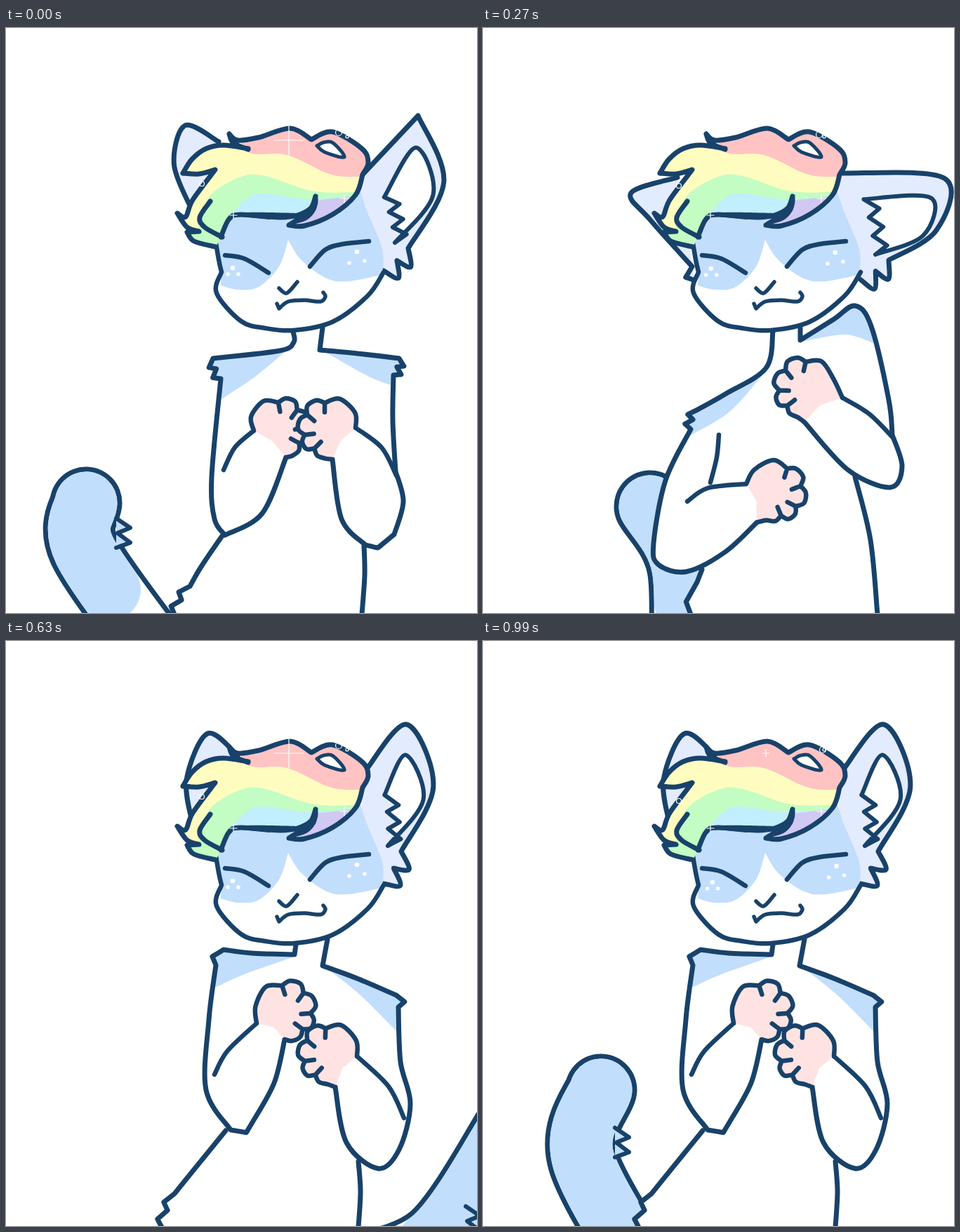
These frames come from a looping animation (671 by 834 pixels, 1080 ms). An HTML page:

```html
<!DOCTYPE html>
<html lang="en">
<head>
<meta charset="utf-8">
<title>Dancing cat</title>
<style>
html, body { margin: 0; width: 100%; height: 100%; overflow: hidden; background: #fff; }
svg { display: block; width: 100vw; height: 100vh; }
path { fill: none; stroke-linecap: round; stroke-linejoin: round; }
.frame {
  visibility: hidden;
  animation: show 1080ms step-end infinite;
  animation-delay: calc(var(--i) * 90ms - 1080ms);
}
@keyframes show {
  0% { visibility: visible; }
  8.33334%, 100% { visibility: hidden; }
}
</style>
</head>
<body>
<svg id="stage" viewBox="0 0 671 834" preserveAspectRatio="none"></svg>
<script>
const INK = '#18426a', BLUE = '#c2defd', EAR = '#e3ebff', PINK = '#ffe3e3';

const pt = (x, y, sharp = false) => ({ x, y, sharp });
const mix = (a, b, t) => pt(a.x + (b.x - a.x) * t, a.y + (b.y - a.y) * t);
const polar = (c, a, r, sharp) => pt(c.x + r * Math.cos(a), c.y + r * Math.sin(a), sharp);
const angle = (c, p) => Math.atan2(p.y - c.y, p.x - c.x);
const corner = p => ({ ...p, sharp: true });

// Point beside the line a-b: t along it, off to the side.
function beside(a, b, t, off) {
  const m = mix(a, b, t), len = Math.hypot(b.x - a.x, b.y - a.y);
  return pt(m.x + (b.y - a.y) / len * off, m.y - (b.x - a.x) / len * off);
}

// Teeth of fur between a and b, both ends excluded.
function fur(a, b, n, size, round = false) {
  const out = [];
  for (let k = 0; k < n; k++) {
    out.push({ ...beside(a, b, (k + .65) / n, size), sharp: !round });
    if (k < n - 1) out.push(corner(beside(a, b, (k + 1) / n, size * .1)));
  }
  return out;
}

// "x,y" points; "!" makes a corner, "~n" puts n teeth of fur before the next point.
function pts(s) {
  const out = [];
  let teeth = 0;
  for (const token of s.split(' ')) {
    const [xy, n] = token.split('~');
    const [x, y] = xy.split(',').map(parseFloat);
    const p = pt(x, y, token.endsWith('!') || !!n || !!teeth);
    if (teeth) out.push(...fur(out[out.length - 1], p, Math.abs(teeth), 10 * Math.sign(teeth)));
    out.push(p);
    teeth = +n || 0;
  }
  return out;
}
const rev = list => [...list].reverse();
const join = (...lists) => lists.flatMap(l => l.map((p, i) => i && i < l.length - 1 ? p : corner(p)));

function curve(list) {
  const p = typeof list === 'string' ? pts(list) : list;
  let d = `M${p[0].x} ${p[0].y}`;
  for (let i = 0; i < p.length - 1; i++) {
    const b = p[i], c = p[i + 1];
    const a = b.sharp || !i ? b : p[i - 1];
    const e = c.sharp || !p[i + 2] ? c : p[i + 2];
    const n = [b.x + (c.x - a.x) / 6, b.y + (c.y - a.y) / 6,
               c.x - (e.x - b.x) / 6, c.y - (e.y - b.y) / 6, c.x, c.y];
    d += 'C' + n.map(v => v.toFixed(1)).join(' ');
  }
  return d;
}
const fill = (s, color) => `<path d="${curve(s)}Z" style="fill:${color}"/>`;
const stroke = (d, w, color = INK, extra = '') =>
  `<path d="${d}" stroke="${color}" stroke-width="${w}" ${extra}/>`;
const line = (s, w = 7) => stroke((typeof s === 'string' ? s.split(';') : [s]).map(curve).join(''), w);

// left/right run neck, shoulder, elbow, wrist; paws are wrist and centre;
// ears are front base, tip, back base.
const poses = {
  A: {
    left: '409,433 410,448 390,460 295,471~-2 306,500 293,640 297,700 312,723! 365,692 399,612',
    right: '451,427 447,459! 500,464 560,471~2 552,495 551,560 555,632! 566,675 553,722~1 512,737 478,700 465,615',
    hipL: '308,724 278,768 262,796~-2 240,836', hipR: '510,738 511,780 507,836',
    folds: '310,630 326,598 353,574;498,570 535,598 556,638',
    paws: '353,574 389,570;498,570 460,570',
    blue: '397,462 355,497 307,529;455,462 515,496 551,510',
    ears: '303,162 255,139 264,258;507,210 587,125! 573,314'
  },
  B: {
    left: '411,433 412,448 370,469 303,500~-2 312,522 270,630 265,670 285,735 325,740 370,690 385,648',
    right: '453,425 452,453! 480,444 532,427~1 547,444 570,510 568,617! 566,675 540,712 500,670 467,592',
    hipL: '300,745 280,778 268,798~-2 258,836', hipR: '517,703 520,760 518,836',
    folds: '300,643 320,617 352,600;497,547 535,567 562,607',
    paws: '352,600 390,600;497,547 450,543',
    blue: '408,464 355,505 308,546;460,452 515,460 560,481',
    ears: '297,167 246,153 265,268;510,205 595,133 573,316'
  },
  C: {
    left: '415,433 405,472 360,500 318,518~-2 303,535 275,612 247,730 250,752~-2 290,767 345,733 388,697',
    right: '452,425 453,449! 500,420 540,403~1 548,418 572,480 582,580 589,655 578,671 540,663 490,612 462,576',
    hipL: '306,765 302,785~-3 288,836', hipR: '526,655 541,740 543,836',
    folds: '342,577 330,610 327,638;298,671 325,646 370,637;500,527 545,557 571,600',
    paws: '370,637 410,648;500,527 455,530',
    blue: '402,474 350,539 298,567;455,449 525,460 572,490',
    ears: '264,191 219,182 275,314;508,207 629,170 566,325'
  },
  D: {
    left: '413,433 403,485 345,522 304,545~-2 296,572 260,645 243,735 250,765 290,775 345,747 390,705',
    right: '452,428 452,445! 500,415 530,396 553,425 578,530 583,580! 597,625 580,655 520,630 458,562',
    hipL: '312,772 305,790~-1 296,836', hipR: '530,640 552,730 562,836',
    folds: '336,580 333,612 324,648;291,675 320,656 375,650;512,527 550,550 585,585',
    paws: '375,650 417,660;512,527 458,512',
    blue: '398,495 350,548 291,583;455,447 515,437 556,449',
    ears: '277,213 211,235 298,340;510,207 657,214 578,331'
  },
  F: {
    left: '413,433 411,447! 350,445 310,440~-1 299,462 289,540 285,640 320,697~-1 350,688 382,630 397,568',
    right: '458,425 451,463! 500,481 556,505~1 559,522 562,600 576,660 560,725 530,752 485,715 469,636',
    hipL: '313,698 265,757 240,788~-2 222,836', hipR: '502,742 505,785 502,836',
    folds: '297,618 315,585 357,545;500,592 545,635 567,680',
    paws: '357,545 398,527;500,592 460,588',
    blue: '408,451 340,475 300,493;455,465 505,505 556,556',
    ears: '330,163 287,132 266,262;512,185 571,119 563,300'
  },
  G: {
    left: '418,432 415,445! 365,433 314,424~-1 304,448 290,560 293,640 311,680! 370,640 411,550',
    right: '458,423 460,480 520,527 560,568~2 576,615 570,690 553,775 515,765 487,725 475,678',
    hipL: '313,682 275,738 235,783~-2 205,836', hipR: '502,762 499,800 490,836',
    folds: '309,610 330,563 379,506;501,630 530,672 552,726',
    paws: '379,506 420,505;501,630 460,620',
    blue: '400,447 340,465 299,496;475,494 515,560 565,604',
    ears: '332,156 300,130 270,258;508,195 564,117 555,298'
  }
};

// A fist: arc from wrist a round to wrist b, bulging between the knuckles.
function paw([a, c], b, dir) {
  const knots = [0, .36, .54, .71, .85, 1], turn = 2 * Math.PI;
  const from = angle(c, a), sweep = ((angle(c, b) - from) * dir + turn) % turn;
  const at = (t, r, sharp) => polar(c, from + dir * sweep * t, r, sharp);
  const edge = [corner(a)];
  let creases = '';
  for (let k = 1; k < knots.length; k++) {
    const t0 = knots[k - 1], dt = knots[k] - t0, last = k === knots.length - 1;
    edge.push(at(t0 + dt * .3, 43), at(t0 + dt * .7, 44));
    if (!last) {
      edge.push(at(knots[k], 36, true));
      creases += curve([at(knots[k], 36), at(knots[k] + .02, 23)]);
    }
  }
  edge.push(corner(b));
  const cuff = mix(mix(a, b, .5), c, .2);
  return fill([...edge, cuff], PINK) + stroke(curve(edge) + creases, 6.5);
}

function body(p, key) {
  const left = pts(p.left), right = pts(p.right), hipL = pts(p.hipL), hipR = pts(p.hipR);
  const shape = join(left, hipL, rev(hipR), rev(right));
  const patches = p.blue.split(';').map((s, i) => {
    const q = pts(s), side = i ? 640 : 220;
    return fill([...join(q), pt(side, q[2].y, true), pt(side, 380, true), pt(q[0].x, 380, true)], BLUE);
  });
  const paws = p.paws.split(';').map((s, i) => paw(pts(s), i ? right.at(-1) : left.at(-1), i ? -1 : 1));
  return fill(shape, '#fff') +
    `<clipPath id="clip${key}"><path d="${curve(shape)}Z"/></clipPath>` +
    `<g clip-path="url(#clip${key})">${patches.join('')}</g>` +
    [hipL, hipR, left, right].map(l => line(l)).join('') + line(p.folds, 6.5) + paws.join('');
}

function ears(p) {
  const [[lp, lt, lq], [rp, rt, rq]] = p.ears.split(';').map(pts);
  const size = Math.hypot(rt.x - rq.x, rt.y - rq.y);
  const cheek = pt(lq.x < 295 ? 300 : 302, lq.y + 20), jaw = pt(538, 346 + Math.max(0, rq.y - 315) * .8);
  const back = beside(rt, rq, .48, size * -.23);
  const left = [lp, lt, beside(lt, lq, .48, 20), corner(lq), ...fur(lq, cheek, 1, -12), cheek];
  const right = [rp, rt, beside(rt, rq, .48, -size * .23), corner(rq), ...fur(rq, jaw, 2, 22, true), jaw];
  // The outer edge bows away from the head on either side.
  left[2] = pt(Math.min(left[2].x, 2 * mix(lt, lq, .48).x - left[2].x), left[2].y);
  right[2] = pt(2 * mix(rt, rq, .48).x - back.x, 2 * mix(rt, rq, .48).y - back.y);
  const low = pt(rq.x - 19, rq.y - 8, true), m = mix(rp, rq, .3), front = pt(m.x + 12, m.y, true);
  const inner = [low, mix(right[2], low, .22), mix(rt, rq, .24), front, ...fur(front, low, 3, 19), low];
  return fill(left, EAR) + fill([...right, pt(500, 300, true)], EAR) + fill(inner, '#fff') +
    line(inner, 6) + line(left) + line(right);
}

// Spines, base to tip; the base lies below the stage.
const tails = [
  '225,905 112,745 114,677', '240,900 110,790 64,705', '175,930 138,770 137,688',
  '285,950 285,770 238,682', '560,930 560,800 545,735', '575,910 600,770 582,669',
  '470,890 600,800 668,690', '480,900 610,852 720,690', '470,900 570,800 615,735',
  '500,950 500,850 495,800', '250,950 238,735 285,665', '250,930 143,740 168,640'
];
function tail(spine) {
  const d = curve(spine), m = pts(spine)[1];
  const a = pt(m.x + 45, m.y - 46), b = pt(m.x + 45, m.y - 4);
  const tuft = [corner(a), ...fur(a, b, 2, 20), corner(b)];
  return stroke(d, 103) + stroke(d, 89, '#fff') +
    stroke(d, 89, BLUE, 'stroke-dasharray="999" stroke-dashoffset="-130"') +
    fill(tuft, BLUE) + line(tuft, 6);
}

function head() {
  const jaw = '298,300 303,330 307,348! 300,378 335,418 370,428 410,431 465,419 515,382 538,348';
  const mask = '298,300! 303,330 307,348! 306,367! 330,373 360,369 389,340 402,302! 423,333 470,361 536,352! 536,315 513,258 503,225! 320,255!';
  const crown = '318,151 330,160 360,156 405,143 435,159! 465,148 507,172 516,192 508,209';
  const rim = '508,209 498,238 465,266 425,282 403,281! 437,258 441,240!';
  const fringe = '441,240 434,257 415,267 390,270 335,266 318,272 306,298';
  const lock = '308,298 283,284 276,270 291,247';
  const spikes = '299,312 268,304 258,291! 275,290! 258,284 244,264! 256,269 266,245 298,202! 275,208 252,207!';
  const top = '252,207 265,187 285,172 310,167 345,172!';
  const hole = '443,168! 453,163 466,164 482,184 454,177 443,168!';
  const shape = join(...[crown, rim, fringe, spikes, top].map(pts));
  return fill(jaw, '#fff') + fill(mask, BLUE) + line(jaw, 6.5) +
    `<clipPath id="hair"><path d="${curve(shape)}Z"/></clipPath><g clip-path="url(#hair)">` +
    fill('240,130! 530,130! 530,320! 240,320!', '#fffcc0') +
    fill('310,140! 345,177 400,181 455,206 485,212 530,211! 530,130!', '#ffc3c3') +
    fill('250,289! 274,290! 290,240 335,212 370,211 440,233 515,233! 500,320! 250,325!', '#c3fdc3') +
    fill('312,275! 345,242 370,236 430,244 510,239! 500,300! 312,300!', '#c2eefd') +
    fill('441,246! 512,238! 490,290! 395,290! 436,257', '#d1c8f3') + '</g>' +
    fill('325,268! 345,263 415,264! 375,273', INK) +
    fill('441,240! 442,258 428,274 403,281! 434,257', INK) +
    line([crown, rim, fringe, lock, spikes, top, '318,151 324,164 345,173'].join(';')) +
    fill(hole, '#fff') + line(hole, 5) +
    line('312,324 340,329 374,349;433,340 455,316 480,308 517,304', 6.5) +
    line('389,371 400,378 415,362;386,393 389,400! 402,390 425,388 448,390 455,383 452,377', 5.5);
}

const cross = (x, y, r) => `M${x - r} ${y}h${2 * r}M${x} ${y - r}v${2 * r}`;
const ring = (x, y, r) => `M${x - r} ${y}a${r} ${r} 0 1 0 ${2 * r} 0a${r} ${r} 0 1 0 ${-2 * r} 0`;
const glints = phase => stroke(cross(403, 160, [21, 0, 5][phase]) + ring(474 + phase * 5, 149 + phase * 3, 4.5) +
  ring(486, 155, 2) + cross(482, 243, 6) + cross(324, 267, 5) + ring(279, 222 + phase * 3, 3.5), 1.2, '#fff');

const freckles = phase => [[323, 342], [316, 351], [331, 351], [500, 319], [489, 335], [511, 332]]
  .map(([x, y], i) => `<circle cx="${x + phase * 1.8}" cy="${y + phase}" r="${i % 3 ? 2.8 : 3.3}" fill="#fff"/>`).join('');

let defs = `<g id="head">${head()}</g>`;
for (const [k, p] of Object.entries(poses)) {
  defs += `<g id="body${k}">${body(p, k)}</g><g id="ears${k}">${ears(p)}</g>`;
}

// H is G leaning a little further.
const frames = [...'ABCDCBAFGHGF'].map((key, i) => {
  const far = key === 'H', k = far ? 'G' : key, phase = (i >> 1) % 3;
  return `<g class="frame" style="--i:${i}">${tail(tails[i])}` +
    `<use href="#body${k}"${far ? ' transform="rotate(2 430 640)"' : ''}/>` +
    `<use href="#ears${k}"${far ? ' transform="translate(-3 -5)"' : ''}/>` +
    `<use href="#head"/>${freckles(phase)}${glints(phase)}</g>`;
});
document.getElementById('stage').innerHTML = `<defs>${defs}</defs>` + frames.join('');
</script>
</body>
</html>
```
